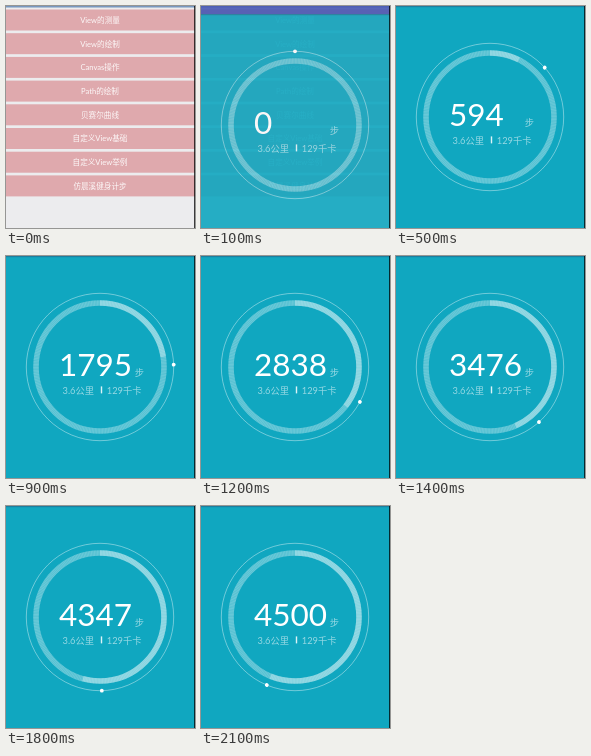
Recreate the animation shown at these times as an HTML page. Size 189 by 222 pixels, loop 2.2 s.

```html
<!DOCTYPE html>
<html lang="zh">
<head>
<meta charset="utf-8">
<title>计步</title>
<style>
  html, body { margin: 0; width: 100%; height: 100%; overflow: hidden; background: #ececee; }
  svg { display: block; width: 189px; height: 222px; }
  text { font-family: Lato, "Noto Sans CJK SC", "Noto Sans CJK", sans-serif; fill: #fff; }
  .row { font-size: 7.6px; text-anchor: middle; fill-opacity: .92; }
  .count { font-size: 31.5px; }
  .small { font-size: 9.3px; fill-opacity: .56; }
  .ring { fill: none; stroke: #fff; stroke-width: 5.6; }
</style>
</head>
<body>
<svg viewBox="0 0 189 222">
  <rect width="189" height="222" fill="#ececee"/>
  <rect width="189" height="1.5" fill="#7898bf"/>
  <g id="list"></g>
  <g id="page">
    <rect y="-12" width="189" height="12" fill="#4a5ab5"/>
    <rect width="189" height="222" fill="#10a7c0"/>
    <rect width="189" height="1.2" fill="#1b7f9f"/>
    <circle cx="94" cy="111" r="73.7" fill="none" stroke="#fff" stroke-opacity=".5" stroke-width=".8"/>
    <g transform="rotate(-90 94 111)">
      <circle class="ring" cx="94" cy="111" r="64" stroke-opacity=".28"/>
      <circle class="ring" cx="94" cy="111" r="64" stroke-opacity=".16" pathLength="540" stroke-dasharray="1 1"/>
      <circle class="ring" id="arc" cx="94" cy="111" r="64" stroke-opacity=".29" pathLength="8000"/>
    </g>
    <circle id="dot" cx="94" cy="37.3" r="1.9" fill="#fff"/>
    <text class="count" id="count" x="53" y="120">0</text>
    <text class="small" x="128.7" y="120.4">步</text>
    <text class="small" x="56.5" y="137.5">3.6公里</text>
    <rect x="94.8" y="130.4" width="1.4" height="7" fill="#fff" fill-opacity=".85"/>
    <text class="small" x="100.8" y="137.5">129千卡</text>
  </g>
  <rect x="188" width="1" height="222" fill="#000" fill-opacity=".75"/>
</svg>
<script>
  const LOOP = 2200, STEP = 100, START = 23, DURATION = 2015;
  const GOAL = 8000, STEPS = 4500;
  const $ = id => document.getElementById(id);
  const page = $('page'), arc = $('arc'), dot = $('dot'), count = $('count');

  const titles = ['View的测量', 'View的绘制', 'Canvas操作', 'Path的绘制',
    '贝赛尔曲线', '自定义View基础', '自定义View举例', '仿晨溪健身计步'];
  $('list').innerHTML = titles.map((title, i) => {
    const y = 14 + i * 23.7;
    return `<rect y="${y - 10.5}" width="189" height="21" fill="#dfa9ad"/>
      <text class="row" x="94" y="${y + 2.8}">${title}</text>`;
  }).join('');

  function draw(now) {
    const time = Math.floor(now % LOOP / STEP) * STEP;
    // The page slides up and fades in over the list
    const left = Math.max(0, 1 - (time - 100) / 300);
    page.style.opacity = time < 100 ? 0 : Math.min(1, .9 + (time - 100) / 1500);
    page.setAttribute('transform', `translate(0 ${8 * left * left})`);

    // The dot turns evenly; count and arc ease in and out
    const p = time <= 100 ? 0 : Math.min(1, (time - START) / DURATION);
    const n = Math.round(STEPS * (1 - Math.cos(Math.PI * p)) / 2);
    dot.setAttribute('transform', `rotate(${360 * STEPS / GOAL * p} 94 111)`);
    arc.setAttribute('stroke-dasharray', `${n} ${GOAL}`);
    count.textContent = n;
  }

  const origin = performance.now();
  function tick() {
    draw(performance.now() - origin);
    requestAnimationFrame(tick);
  }
  tick();
</script>
</body>
</html>
```
